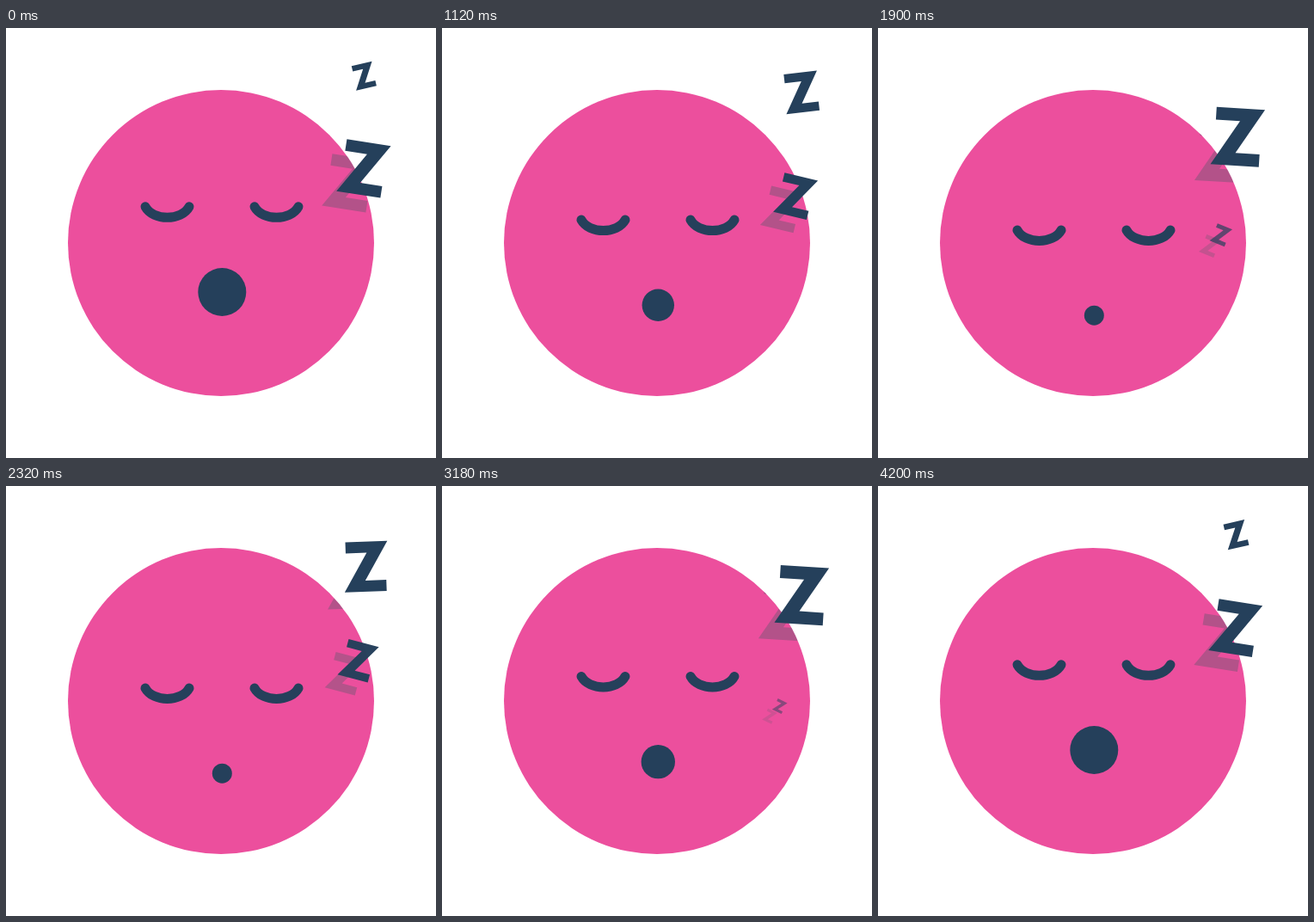
An HTML page that plays this animation: 500x500 px, repeating every 4.22 s.

```html
<!DOCTYPE html>
<html lang="en">
<head>
<meta charset="utf-8">
<title>Sleeping face</title>
<style>
  html, body { margin: 0; width: 100%; height: 100%; overflow: hidden; background: #fff; }
  svg { display: block; width: 100vw; height: 100vh; }
</style>
</head>
<body>
<svg viewBox="0 0 500 500">
  <defs>
    <clipPath id="faceClip"><circle cx="250" cy="250" r="178"/></clipPath>
    <path id="lid" d="M162 207.8C171 224.4 204 224.4 213 207.8"/>
    <path id="zed" d="M-25-31.5H28L-1.5 17.5H25V31.5H-28L1.5-17.5H-25Z"/>
  </defs>
  <circle cx="250" cy="250" r="178" fill="#ec4f9d"/>
  <g id="eyes" fill="none" stroke="#25405b" stroke-width="11" stroke-linecap="round">
    <use href="#lid"/>
    <use href="#lid" x="127"/>
  </g>
  <circle id="mouth" cx="251.3" fill="#25405b"/>
  <g id="shadows" clip-path="url(#faceClip)" fill="#3f5a62"></g>
  <g id="letters" fill="#25405b"></g>
</svg>
<script>
  const LOOP = 4220;
  const LIFE = 0.7 * LOOP;
  const BIRTHS = [75, 1360, 2818];
  const FADE_IN = 1100;
  const SHADOW_ALPHA = 0.33;
  const { PI, sin, cos, abs, min } = Math;

  const byId = id => document.getElementById(id);
  const eyes = byId('eyes');
  const mouth = byId('mouth');

  function addZ(parent) {
    const use = document.createElementNS('http://www.w3.org/2000/svg', 'use');
    use.setAttribute('href', '#zed');
    return parent.appendChild(use);
  }

  const zs = BIRTHS.map(birth => ({
    birth,
    shadow: addZ(byId('shadows')),
    letter: addZ(byId('letters'))
  }));

  // Drift up along an arc, swing from right to left, swell and shrink; u runs 0 to 1
  function pose(u) {
    return {
      x: 418.6 - 95 * abs(0.73 - u) ** 2.6,
      y: 290.5 - 268 * u + 110 * (u - 0.36) ** 3,
      scale: 0.565 + 0.5 * cos(PI * (u - 0.6) / 0.65),
      turn: 6 - 36 * (u - 0.55) - 58 * (u - 0.55) ** 3,
      gap: 9.5 + 11 * sin(PI / 2 * u)
    };
  }

  function place(el, { x, y, scale, turn }, shift, alpha) {
    el.setAttribute('transform',
      `translate(${x - shift} ${y + shift}) rotate(${turn}) scale(${scale})`);
    el.setAttribute('opacity', alpha);
  }

  function drawFace(t) {
    const u = 1 - abs(2 * t / LOOP - 1);
    const p = u * u * (3 - 2 * u);
    eyes.setAttribute('transform', `translate(0 ${28 * p})`);
    mouth.setAttribute('cy', 307 + 28 * p);
    mouth.setAttribute('r', 28 - 17 * p);
  }

  function drawZ({ birth, letter, shadow }, t) {
    const age = (t - birth + LOOP) % LOOP;
    const alive = age < LIFE;
    const p = pose(age / LIFE);
    const alpha = alive ? sin(PI / 2 * min(1, age / FADE_IN)) : 0;
    place(letter, p, 0, alpha);
    place(shadow, p, p.gap, alpha * SHADOW_ALPHA);
  }

  const begin = performance.now();
  function tick() {
    const t = (performance.now() - begin) % LOOP;
    drawFace(t);
    zs.forEach(z => drawZ(z, t));
    requestAnimationFrame(tick);
  }
  tick();
</script>
</body>
</html>
```
